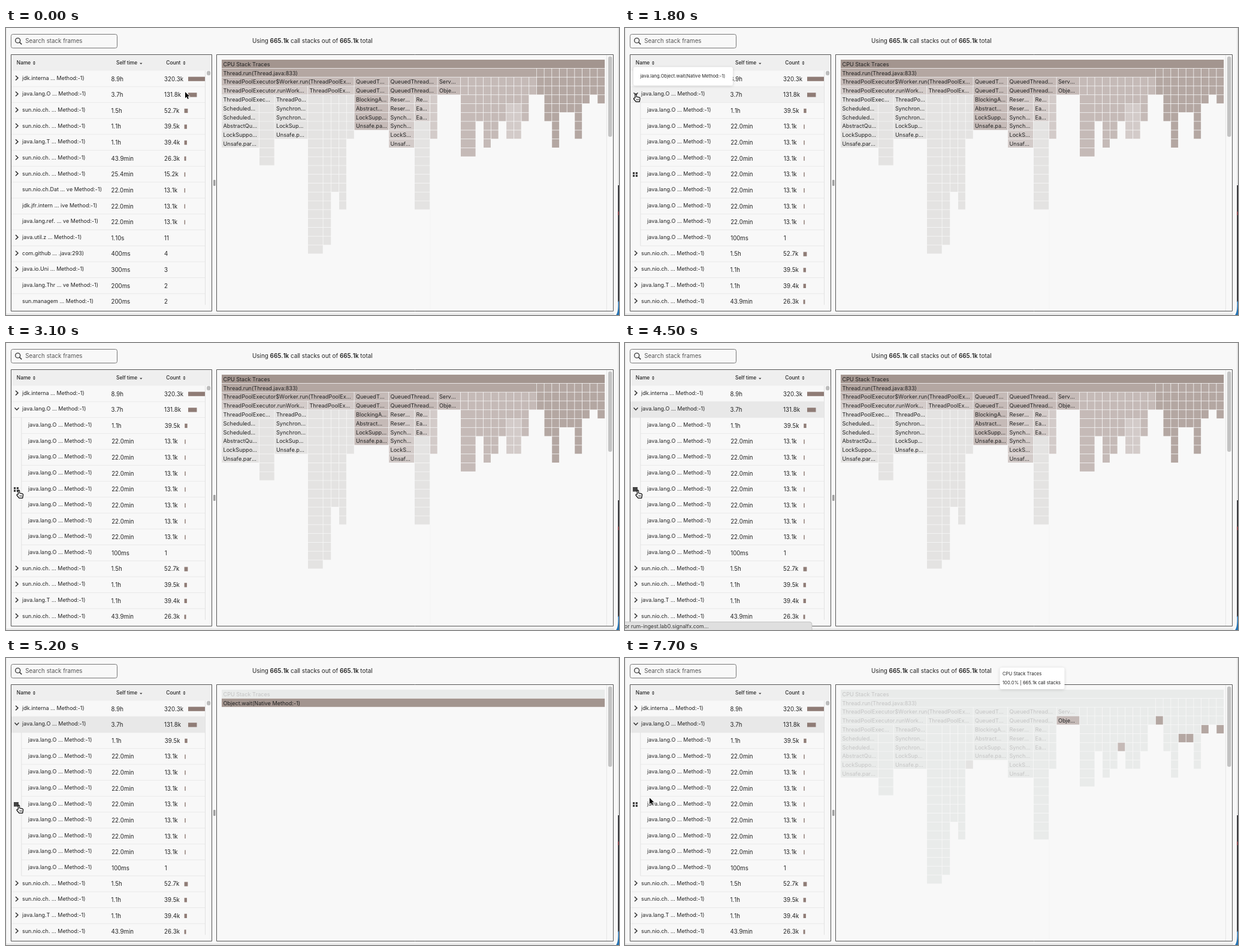
An HTML page with a canvas for the animation above (8 s loop, 1023x480 px).

```html
<!DOCTYPE html>
<html lang="en">
<head>
<meta charset="utf-8">
<title>Call stack explorer</title>
<style>
html, body { margin: 0; width: 100%; height: 100%; overflow: hidden; background: #f8f8f8; }
canvas { display: block; }
</style>
</head>
<body>
<canvas id="stage" width="1023" height="480"></canvas>
<script>
const ctx = document.getElementById('stage').getContext('2d');
const LOOP = 8000, BG = '#f8f8f8', INK = '#222';
const METHOD = 'java.lang.Object.wait(Native Method:-1)';

// ---------- drawing helpers ----------
function rect(x, y, w, h, color) {
  ctx.fillStyle = color;
  ctx.fillRect(x, y, w, h);
}
function round(x, y, w, h, r, fill, stroke) {
  ctx.beginPath();
  ctx.roundRect(x, y, w, h, r);
  if (fill) { ctx.fillStyle = fill; ctx.fill(); }
  if (stroke) { ctx.strokeStyle = stroke; ctx.lineWidth = 1; ctx.stroke(); }
}
function text(str, x, y, size, color = INK, weight = 400) {
  ctx.font = `${weight} ${size}px Inter, sans-serif`;
  ctx.fillStyle = color;
  ctx.fillText(str, x, y);
  return x + ctx.measureText(str).width;
}
function line(points, color, width) {
  ctx.beginPath();
  points.forEach(([x, y]) => ctx.lineTo(x, y));
  ctx.strokeStyle = color;
  ctx.lineWidth = width;
  ctx.stroke();
}
function triangle(x, y, dir) {
  ctx.beginPath();
  ctx.moveTo(x - 2.2, y);
  ctx.lineTo(x + 2.2, y);
  ctx.lineTo(x, y + 2.4 * dir);
  ctx.fillStyle = '#333';
  ctx.fill();
}
function faded(alpha, draw) {
  if (alpha <= 0) return;
  ctx.save();
  ctx.globalAlpha = alpha;
  draw();
  ctx.restore();
}
const ramp = (t, a, b) => Math.min(1, Math.max(0, (t - a) / (b - a)));
const within = (t, a, b) => t >= a && t < b;

// ---------- table ----------
const ROW_TOP = 71.4, ROW_H = 26.63;
const parseRow = s => {
  const [name, time, count] = s.split('|');
  return { name, time, count, open: !/^(sun\.nio\.ch\.Dat|jdk\.jfr|java\.lang\.ref|java\.lang\.Thr|sun\.man)/.test(name) };
};
const rows = [
  'jdk.interna … Method:-1)|8.9h|320.3k',
  'java.lang.O … Method:-1)|3.7h|131.8k',
  'sun.nio.ch. … Method:-1)|1.5h|52.7k',
  'sun.nio.ch. … Method:-1)|1.1h|39.5k',
  'java.lang.T … Method:-1)|1.1h|39.4k',
  'sun.nio.ch. … Method:-1)|43.9min|26.3k',
  'sun.nio.ch. … Method:-1)|25.4min|15.2k',
  'sun.nio.ch.Dat … ve Method:-1)|22.0min|13.1k',
  'jdk.jfr.intern … ive Method:-1)|22.0min|13.1k',
  'java.lang.ref. … ve Method:-1)|22.0min|13.1k',
  'java.util.z … Method:-1)|1.10s|11',
  'com.github … .java:293)|400ms|4',
  'java.io.Uni … Method:-1)|300ms|3',
  'java.lang.Thr … ve Method:-1)|200ms|2',
  'sun.managem … Method:-1)|200ms|2'
].map(parseRow);
const children = Array.from({ length: 9 }, (_, i) => ({
  name: 'java.lang.O … Method:-1)', child: true,
  time: i === 0 ? '1.1h' : i === 8 ? '100ms' : '22.0min',
  count: i === 0 ? '39.5k' : i === 8 ? '1' : '13.1k'
}));
const expandedRows = [...rows.slice(0, 2), ...children, ...rows.slice(2)].slice(0, 15);

function drawRow(row, i, expanded) {
  const y = ROW_TOP + (i + .5) * ROW_H - .6, dx = row.child ? .7 : 0;
  rect(row.child ? 26 : 9, ROW_TOP + (i + 1) * ROW_H - .5, row.child ? 306 : 323, 1, '#e9e9e9');
  if (row.open) {
    const down = expanded && i === 1;
    line(down ? [[14.5, y - 2.5], [18, y + 1.2], [21.5, y - 2.5]]
              : [[16, y - 4.3], [20, y - .5], [16, y + 3.3]], '#333', 1.5);
  }
  text(row.name, row.child ? 37 : 27, y, 9);
  text(row.time, 175.5 + dx, y + 1.5, 9.7);
  text(row.count, 264 + dx, y + 1.5, 9.7);
  if (row.count.endsWith('k')) {
    const wide = row.count.length > 5;
    rect(wide ? 304 : 297.6 + dx, y - 2.5, Math.min(28, parseFloat(row.count) * .11), 7.2, '#8f7c76');
  }
}

function drawTable(t, tips) {
  const expanded = t >= 1800;
  rect(9, 45, 334, 26.4, '#efefef');
  text('Name', 17.8, 58.8, 8.4, INK, 500);
  text('Self time', 184, 58.8, 8.4, INK, 500);
  text('Count', 267.3, 58.8, 8.4, INK, 500);
  [47, 297.5].forEach(x => { triangle(x, 57.8, -1); triangle(x, 59.2, 1); });
  triangle(225.3, 58.4, 1);

  ctx.save();
  ctx.beginPath();
  ctx.rect(9, 71.4, 334, 391.6);
  ctx.clip();
  for (const { row, alpha } of tips)
    faded(alpha, () => rect(9, ROW_TOP + row * ROW_H, 323, ROW_H, '#f1f1f1'));
  if (t >= 4400) rect(9, ROW_TOP + ROW_H, 323, ROW_H, '#e8e8e8');
  (expanded ? expandedRows : rows).forEach((row, i) => drawRow(row, i, expanded));
  if (expanded) {
    rect(25.3, ROW_TOP + 2 * ROW_H, 1, 9 * ROW_H, '#e2e2e2');
    if (within(t, 4400, 7400)) rect(13, 241, 8, 7.5, '#444');
    else for (const x of [13, 17.8]) for (const y of [241.2, 245.6]) rect(x, y, 3.2, 3.2, '#333');
  }
  rect(332, 71, 1, 400, '#e2e2e2');
  ctx.restore();
  round(335, 71.8, 6.4, 7.4, 3.2, '#bdbdbd');
  round(8.5, 44.5, 335, 429, 0, null, '#555');
}

// ---------- flame graph ----------
const SHADES = ['#a3958f', '#b4a7a2', '#c5bab7', '#d3cbc9', '#e4e3e2'];
const cells = [];
function stack(x, x2, row, last, shade, labels = [], hitRow = -1) {
  for (let r = row; r <= last; r++)
    cells.push({ x, w: x2 - x, r, color: SHADES[shade], label: labels[r - row], hit: r === hitRow });
}
stack(360, 1000, 0, 0, 0, ['CPU Stack Traces']);
stack(360, 886, 1, 1, 1, ['Thread.run(Thread.java:833)']);
stack(360, 581.5, 2, 2, 2, ['ThreadPoolExecutor$Worker.run(ThreadPoolEx…']);
stack(360, 504, 3, 3, 3, ['ThreadPoolExecutor.runWork…']);
stack(504, 581.5, 3, 3, 3, ['ThreadPoolEx…']);
stack(360, 448.5, 4, 4, 4, ['ThreadPoolExec…']);
stack(360, 423, 5, 9, 4, ['Scheduled…', 'Scheduled…', 'AbstractQu…', 'LockSuppo…', 'Unsafe.par…']);
stack(423, 448.5, 5, 11, 4);
stack(448.5, 504, 4, 8, 4, ['ThreadPo…', 'Synchron…', 'Synchron…', 'LockSup…', 'Unsafe.p…']);
stack(504, 529.5, 4, 21, 4);
stack(529.5, 543, 4, 20, 4);
stack(543, 556, 4, 14, 4);
stack(556, 568.7, 4, 16, 4);
stack(568.7, 581.5, 4, 8, 4, [], 8);
stack(581.5, 639, 2, 7, 2, ['QueuedT…', 'QueuedT…', 'BlockingA…', 'Abstract…', 'LockSupp…', 'Unsafe.pa…']);
stack(639, 720.5, 2, 3, 2, ['QueuedThread…', 'QueuedThread…']);
stack(639, 682, 4, 9, 3, ['Reser…', 'Reser…', 'Synch…', 'Synch…', 'LockS…', 'Unsaf…']);
stack(682, 708, 4, 6, 3, ['Re…', 'Ea…', 'Ea…']);
stack(682, 708, 7, 16, 4);
stack(708, 720.5, 4, 8, 3);
stack(720.5, 759, 2, 3, 2, ['Serv…', 'Obje…'], 3);

const columnEnds = [3, 3, 6, 9, 8, 6, 8, 8, 6, 3, 3, 6, 9, 5, 5, 8, 4, 3, 4];
const columnHits = { 5: 6, 10: 3, 13: 5, 14: 5, 16: 4, 18: 4 };
const columnX = k => 759 + 12.684 * k;
columnEnds.forEach((last, k) => {
  const pale = k === 6 || k === 7;
  stack(columnX(k), columnX(k + 1), k < 10 ? 2 : 1, pale ? 4 : last, k < 10 ? 2 : 1, [], columnHits[k]);
  if (pale) stack(columnX(k), columnX(k + 1), 5, last, 3);
});
stack(columnX(0), columnX(2), 4, 10, 2);

function drawCell({ x, w, r, color, label }, dim) {
  const y = 53 + 14.78 * r;
  rect(x, y, w - .8, 14, dim ? '#e9ebea' : color);
  if (label) text(label, x + 2.5, y + 8.2, 9.1, dim ? '#c4c4c4' : INK);
}
function drawFlame(dim) {
  rect(707.5, 304, 1, 167, '#f3f3f3');
  cells.forEach(cell => drawCell(cell, dim && !cell.hit));
}
function drawZoomed() {
  drawCell(cells[0], true);
  drawCell({ x: 360, w: 640, r: 1, color: SHADES[0], label: 'Object.wait(Native Method:-1)' });
}
function drawGraph(t) {
  const layers = [[drawZoomed, ramp(t, 4600, 5200)], [() => drawFlame(true), ramp(t, 7300, 7500)]];
  drawFlame(false);
  for (const [draw, alpha] of layers) {
    faded(alpha, () => rect(352, 45, 650, 428, BG));
    faded(alpha, draw);
  }
  rect(1002, 45, 1, 428, '#e6e6e6');
  round(1005, 47.5, 6.4, 134.5, 3.2, '#c3c3c3');
  round(351.5, 44.5, 662, 429, 0, null, '#555');
}

// ---------- overlays ----------
function card(x, y, w, h) {
  ctx.save();
  ctx.shadowColor = 'rgba(0,0,0,.16)';
  ctx.shadowBlur = 5;
  ctx.shadowOffsetY = 1;
  round(x, y, w, h, 3, '#fff');
  ctx.restore();
}
const hovers = [
  { row: 1, x: 14, from: 600, to: 2200 },
  { row: 2, x: 20, from: 2200, to: 2700 },
  { row: 7, x: 20, from: 2700, to: 3100 }
];
const activeTips = t => hovers.map(h => ({
  ...h, alpha: Math.min(ramp(t, h.from, h.from + 200), 1 - ramp(t, h.to - 200, h.to))
}));
function drawTip({ row, x, alpha }) {
  const y = ROW_TOP + (row + .5) * ROW_H - 46;
  faded(alpha, () => {
    card(x, y, 166, 31);
    text(METHOD, x + 11.5, y + 15.5, 7.6);
  });
}
function drawGraphTip() {
  card(625.5, 16, 108, 36);
  text('CPU Stack Traces', 630, 26.8, 7.6);
  text('100.0% | 665.1k call stacks', 630, 42.2, 7.6);
}
function drawStatus() {
  round(-5, 466.5, 317, 20, 4, '#dfdfdf', '#c4c4c4');
  text('or rum-ingest.lab0.signalfx.com...', -1, 474.3, 8.8, '#333');
}

// ---------- pointer: time, x, y ----------
const track = [
  [0, 299, 107], [100, 188, 115], [200, 188, 115], [300, 125, 115], [400, 62, 116],
  [500, 62, 116], [600, 18, 110], [2000, 18, 110], [2400, 103, 145], [2600, 95, 190],
  [2900, 45, 264], [3100, 21.5, 246], [6000, 21.5, 246], [6600, 560, 79], [6700, 560, 79],
  [7200, 435, 60], [7300, 435, 60], [7500, 230, 230], [7600, 95, 300], [7700, 41, 234], [8000, 41, 234]
];
const ARROW = new Path2D('M0 0V10.2L2.4 8 4.1 11.8 5.9 11 4.2 7.3H7.4Z');
const HAND = new Path2D('M-1.1 7V1Q0-.9 1.1 1V5L6 6.1Q7.4 6.7 7.1 8.4L6.2 13.3H.4L-3.2 9Q-4 7.3-2.5 7.2Z');
function drawPointer(t) {
  const i = track.findIndex(k => k[0] > t);
  const [a, b] = [track[i - 1], track[i]], p = ramp(t, a[0], b[0]);
  const x = a[1] + (b[1] - a[1]) * p, y = a[2] + (b[2] - a[2]) * p;
  const hand = x < 26 || (x > 352 && y < 83);
  ctx.save();
  ctx.translate(x, y);
  ctx.lineJoin = 'round';
  if (hand) {
    ctx.fillStyle = '#fff';
    ctx.fill(HAND);
    ctx.strokeStyle = '#000';
    ctx.lineWidth = 1.2;
    ctx.stroke(HAND);
    for (const dx of [1.4, 3.1, 4.8]) line([[dx, 8.5], [dx, 11]], '#000', .7);
  } else {
    ctx.strokeStyle = '#fff';
    ctx.lineWidth = 1.6;
    ctx.stroke(ARROW);
    ctx.fillStyle = '#000';
    ctx.fill(ARROW);
  }
  ctx.restore();
}

function drawFrame() {
  rect(0, 0, 1023, 480, BG);
  rect(0, 0, 1, 480, '#e6e6e6');
  rect(0, 478, 1015, 1, '#d4d4d4');
  rect(1021.4, 0, 1.6, 263, '#dcdcdc');
  rect(1021.4, 263, 1.6, 195, '#15151a');
  rect(1021.4, 307, 1.6, 6, '#8a3a40');
  ctx.beginPath();
  ctx.moveTo(1023, 456);
  ctx.lineTo(1021.5, 458);
  ctx.quadraticCurveTo(1022, 476, 1018, 480);
  ctx.lineTo(1023, 480);
  ctx.fillStyle = '#2272b4';
  ctx.fill();

  round(8.5, 10.5, 177, 23, 3, BG, '#777');
  ctx.beginPath();
  ctx.arc(19.7, 20.9, 4, 0, 7);
  ctx.strokeStyle = '#333';
  ctx.lineWidth = 1.3;
  ctx.stroke();
  line([[22.6, 23.8], [26.2, 27.4]], '#333', 1.5);
  text('Search stack frames', 32.3, 22.3, 9.8, '#555');

  let x = 411;
  ['Using ', '665.1k', ' call stacks out of ', '665.1k', ' total'].forEach((part, i) => {
    x = text(part, x, 22.3, 9.9, INK, i % 2 ? 600 : 400);
  });
  round(346, 254, 3.6, 10, 1, '#a0a0a0');
}

function render() {
  const t = Math.floor(performance.now() % LOOP / 100) * 100;
  const tips = activeTips(t);
  ctx.textBaseline = 'middle';
  ctx.fontKerning = 'none';
  drawFrame();
  drawTable(t, tips);
  drawGraph(t);
  tips.forEach(drawTip);
  faded(ramp(t, 7300, 7500), drawGraphTip);
  if (within(t, 4400, 5200)) faded(1 - ramp(t, 4900, 5200), drawStatus);
  drawPointer(t);
  requestAnimationFrame(render);
}
render();
</script>
</body>
</html>
```
